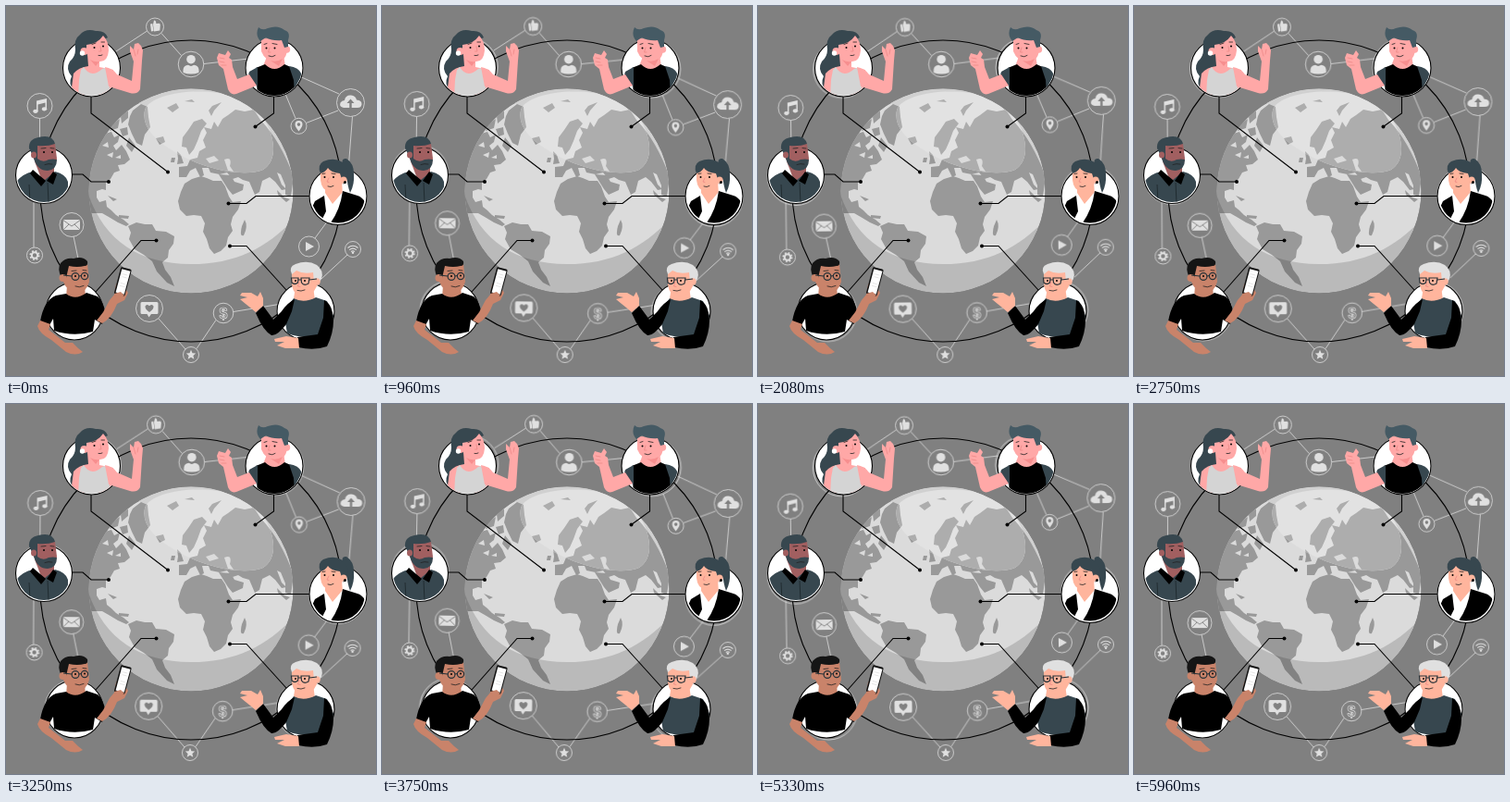
Write an HTML page that moves like this. It is 400 px wide and 400 px high and loops after 6000 ms.

```html
<!DOCTYPE html>
<html lang="en">
<head>
<meta charset="utf-8">
<title>Connected people</title>
<style>
html, body { margin: 0; width: 100%; height: 100%; overflow: hidden; background: #808080; }
svg { display: block; width: 100vw; height: 100vh; }
.wire { fill: none; stroke: #000; stroke-width: 1.1; }
.net { fill: none; stroke: #dadada; stroke-width: .85; }
.glyph { fill: #e0e0e0; }
.disc { fill: #fff; stroke: #000; stroke-width: 1.1; }
.slate { fill: #37474f; }
.steel { fill: #455a64; }
.pink { fill: #ffa8a7; }
.rose { fill: #f78f8f; }
.peach { fill: #ffb59d; }
.brown { fill: #c9836a; }
.dark { fill: #a15f60; }
.ink { fill: none; stroke: #222; stroke-width: .8; stroke-linecap: round; }
.crease { fill: none; stroke: #e98583; stroke-width: .7; stroke-linecap: round; }
.sway { transform-origin: 200px 200px; animation: sway 3s infinite; }
@keyframes sway {
  0% { transform: rotate(0deg); animation-timing-function: steps(18); }
  25% { transform: rotate(1deg); animation-timing-function: steps(36); }
  75% { transform: rotate(-1deg); animation-timing-function: steps(18); }
  100% { transform: rotate(0deg); }
}
</style>
</head>
<body>
<svg viewBox="0 0 400 400">
<defs>
  <clipPath id="globe"><circle cx="200" cy="200" r="110.5"/></clipPath>
  <path id="cap" d="M150 113C156 90 238 83 270 110C291 133 296 166 278 177C255 186 208 175 178 155C157 142 147 128 150 113Z"/>
  <clipPath id="glow"><use href="#cap"/></clipPath>
  <clipPath id="c1"><circle cx="92.500" cy="67" r="30"/></clipPath>
  <clipPath id="c2"><circle cx="290" cy="67" r="30"/></clipPath>
  <clipPath id="c3"><circle cx="41" cy="183" r="29"/></clipPath>
  <clipPath id="c4"><circle cx="359" cy="205.500" r="29"/></clipPath>
  <g id="land">
    <path d="M137 113L146 106L153 109L154 120L156 131L150 139L147 151L141 148L136 138L132 128L134 119Z"/>
    <path d="M124 119L132 113L132 121L125 127ZM115 128L123 122L121 132L112 135ZM123 133L131 131L132 139L126 141ZM133 142L140 151L136 158L130 151Z"/>
    <path d="M104 139L114 136L117 142L123 139L121 147L116 151L119 156L125 150L130 157L134 166L128 171L121 172L123 178L117 180L113 187L108 191L108 199L104 198L98 200L98 207L101 212L108 210L109 217L114 221L119 226L127 231L133 236L130 238L121 234L111 228L104 224L88 224V165Z"/>
    <path d="M110 205L120 209L116 211ZM122 226L133 227L132 230L122 229Z"/>
    <path d="M132 238L141 234L150 236L158 236L162 243L173 244L182 249L181 257L176 264L175 272L169 277L172 285L178 293L182 303L174 299L163 287L158 276L149 269L139 263L133 252L135 245Z"/>
    <path d="M193 192L201 187L211 184L217 186L224 189L233 189L237 195L241 206L245 212L254 211L251 220L245 228L243 236L245 243L240 250L238 259L232 265L225 268L220 262L217 252L213 244L215 235L211 227L203 226L195 227L188 220L186 211L189 201Z"/>
    <path d="M258 231Q262 238 257 248Q252 250 255 238Z"/>
    <path d="M230 182L243 183L247 190L257 193L256 199L245 204L240 198L235 190Z"/>
    <path d="M187 174L196 173L199 166L207 164L209 157L216 153L213 145L217 137L214 131L222 133L225 125L229 131L234 122L240 118L248 112L258 114L268 112L275 123Q297 146 311 185L308 206L302 204L302 194L297 182L293 180L298 193L303 198L298 199L291 190L285 185L277 189L274 201L269 204L263 190L256 188L251 185L245 187L239 180L231 182L221 180L219 175L212 175L214 183L210 185L205 175L199 178L195 185L187 185Z"/>
    <path d="M190 152L191 142L197 134L203 125L212 122L217 127L211 135L207 146L203 155L198 161L195 153ZM185 157L189 161L192 170L185 171L186 165ZM179 164L183 164L182 169L178 169Z"/>
    <path d="M174 110L184 105L187 110L180 115ZM162 143L170 141L172 147L166 150ZM219 113L223 108L233 104L225 113L222 119ZM193 103L201 101L204 104Z"/>
    <path d="M293 199L301 207L307 209L303 212L294 204Z"/>
  </g>
</defs>
<rect width="400" height="400" fill="#808080"/>

<!-- globe -->
<g clip-path="url(#globe)">
  <circle cx="200" cy="200" r="110.5" fill="#dbdbdb"/>
  <path d="M140 103L200 85L270 100L315 180L278 177Z" fill="#d0d0d0"/>
  <use href="#land" fill="#999"/>
  <use href="#cap" fill="#e2e2e2"/>
  <use href="#land" fill="#adadad" clip-path="url(#glow)"/>
  <g fill="#dbdbdb">
    <path d="M216 165L225 162L230 167L220 170ZM236 166Q245 162 242 173L246 179L240 178Z"/>
    <path d="M104 151L110 147L111 153ZM109 161L116 158L115 164ZM118 164L124 161L124 165Z"/>
  </g>
  <path d="M85 190C100 250 140 279 200 279C250 279 285 260 315 226V320H85Z" opacity=".15"/>
</g>

<!-- swaying network -->
<g class="sway">
  <g class="net">
    <path d="M119 49L152.500 27M168 29.500L189.500 53.500M214 62.500L262 57M315 75L360 95M302 95L313 121.500M324.500 126.500L359 113M374.500 119.500L370 178M348 232L334 251M369 269L341 295M298 322L246 330.500M227 339.500L206 370.500M165 338L194 371M73 249L79 278M30 261V202M36.500 121.500V152"/>
    <circle cx="92.500" cy="67" r="31"/><circle cx="290" cy="67" r="31"/>
    <circle cx="41" cy="183" r="30.500"/><circle cx="359" cy="205.500" r="31"/>
    <circle cx="74" cy="330" r="31"/><circle cx="324" cy="330" r="31"/>
    <circle cx="161" cy="22.500" r="9.500"/><circle cx="200" cy="63" r="13.800"/>
    <circle cx="36.500" cy="108" r="13.500"/><circle cx="372.500" cy="104.500" r="15"/>
    <circle cx="316.500" cy="129.800" r="8.500"/><circle cx="71" cy="236.500" r="13"/>
    <circle cx="31" cy="269.500" r="8.500"/><circle cx="327.500" cy="260" r="11"/>
    <circle cx="375" cy="263" r="8.500"/><circle cx="155" cy="327" r="14.500"/>
    <circle cx="235" cy="332" r="10.800"/><circle cx="200" cy="377" r="8.500"/>
  </g>
  <g class="glyph">
    <path d="M156 19.500L158.300 19L159.500 27L157 27.500ZM159 20L160 15.500Q162.500 15.500 162.300 19L166 18.700Q167.300 20 166.700 22L166.300 26.500L160 27.500Z"/>
    <circle cx="200" cy="57.700" r="4.800"/>
    <path d="M191.500 72V69Q192 64 197 63.800Q200 66 203 63.800Q208 64 208.500 69V72Q200 75 191.500 72Z"/>
    <path d="M33 102.500L44 100V111H42.500V104.500L34.500 106.500V114H33Z"/>
    <ellipse cx="32" cy="113.800" rx="2.700" ry="2.100"/><ellipse cx="41.500" cy="111.300" rx="2.700" ry="2.100"/>
    <path d="M365 110Q360 109 361.500 104.500Q363 102 366 102Q367 96 373 96.500Q378 97 379 101.500Q385 102 384.500 106.500Q384 110 380 110Z"/>
    <path d="M372.500 100.500L376.500 105H373.700V110H371.300V105H368.500Z" fill="#808080"/>
    <path d="M316.500 135.500Q312.300 130 312.500 128A4 4 0 0 1 320.500 128Q320.700 130 316.500 135.500ZM316.500 126.300A1.800 1.800 0 1 0 316.500 129.900A1.800 1.800 0 1 0 316.500 126.300Z" fill-rule="evenodd"/>
    <rect x="62" y="231" width="18" height="11" rx="1"/>
    <path d="M62 231.700L71 238L80 231.700M62 241.800L68 236M80 241.800L74 236" fill="none" stroke="#808080" stroke-width=".9"/>
    <path d="M324 255L333 260L324 265Z"/>
    <circle cx="375" cy="266.800" r="1.200"/>
    <path d="M147 320H163Q164.500 320 164.500 321.500V331.500Q164.500 333 163 333H157L154.500 336.500L152.500 333H147Q145.500 333 145.500 331.500V321.500Q145.500 320 147 320Z"/>
    <path d="M155 331Q150 327.500 150.500 324.500Q152 321.500 155 324.200Q158 321.500 159.500 324.500Q160 327.500 155 331Z" fill="#808080"/>
    <path d="M200 371.700L201.500 375.200L205.200 375.500L202.400 378L203.300 381.700L200 379.700L196.700 381.700L197.600 378L194.800 375.500L198.500 375.200Z"/>
    <text x="235" y="337.500" fill="none" stroke="#e0e0e0" stroke-width=".7" font-family="Liberation Sans, Arial, sans-serif" font-size="16" font-weight="bold" text-anchor="middle">$</text>
  </g>
  <g fill="none" stroke="#e0e0e0">
    <circle cx="31" cy="269.500" r="3.200" stroke-width="2"/>
    <circle cx="31" cy="269.500" r="4.700" stroke-width="1.800" stroke-dasharray="1.850"/>
    <path d="M369.500 261.500Q375 257 380.500 261.500M371.200 263.700Q375 260.500 378.800 263.700M373 265.500Q375 264 377 265.500" stroke-width="1.100"/>
  </g>
</g>

<!-- fixed wiring -->
<g class="wire">
  <circle cx="200" cy="200" r="163"/>
  <path d="M92 97V116L175 179.500M289.500 97V116L269.500 130.500M71 182H83L92 190H111M329 205.500H270L260 213.500H240.500M97 309L146 253.500H162.500M242 259.500H260L303 307"/>
</g>
<g>
  <circle cx="175" cy="179.500" r="2"/><circle cx="269.500" cy="130.500" r="2"/><circle cx="111" cy="190" r="2"/>
  <circle cx="240.500" cy="213.500" r="2"/><circle cx="162.500" cy="253.500" r="2"/><circle cx="242" cy="259.500" r="2"/>
</g>
<g class="disc">
  <circle cx="92.500" cy="67" r="31"/><circle cx="290" cy="67" r="31"/><circle cx="41" cy="183" r="30.500"/>
  <circle cx="359" cy="205.500" r="31"/><circle cx="74" cy="330" r="31"/><circle cx="324" cy="330" r="31"/>
</g>

<!-- woman, top left -->
<g>
  <path class="slate" d="M110 34Q107 26 97 27Q86 24 80 31Q73 36 75 47Q75 55 69 60Q64 68 71 76Q67 84 73 90Q80 92 84 84L91 66L90 46Z"/>
  <g clip-path="url(#c1)">
    <path class="pink" d="M88 52L101 57L101 66L116 69L122 96H70L73 73Q79 66 89 65Z"/>
    <path d="M81 69L84 66Q92 79 104 68L107 67L113 79L111 99H78L79 80Z" fill="#d4d4d4"/>
  </g>
  <path class="pink" d="M107 66Q115 67 120 74L136 81L138 60L134 49L134 43L138 47L139 41L143 40L146 43L148 48L147 59L145 90Q142 96 134 94L111 87Z"/>
  <path class="pink" d="M87 42Q99 41 105 32Q111 38 111 48Q110 60 102 60Q91 60 87 51Z"/>
  <circle class="pink" cx="84.500" cy="49" r="4"/><circle cx="82.500" cy="51" r="2.700" fill="#fff"/>
  <path class="rose" d="M91 58Q96 61 101 60L97 65Z"/>
  <circle cx="95.500" cy="45" r="1"/><circle cx="105" cy="43.500" r="1"/>
  <path class="ink" d="M93 41.500L97 40M103 39L106.500 39M100 53.500Q102 54 104 53"/>
  <path class="crease" d="M102 44L103 49L100.500 49M138 47L140 54M143 47L142 52"/>
</g>

<!-- man, top right -->
<g>
  <g clip-path="url(#c2)">
    <path class="pink" d="M283 52H300L302 66L291 73L278 65Z"/>
    <path d="M270 67L280 63Q290 73 301 63L310 67L315 78L313 99H272Z"/>
    <path class="slate" d="M306 65Q318 66 321 77V97H312L311 80ZM272 66L263 71L260 82L272 87Z"/>
  </g>
  <path class="pink" d="M263 74L250 79L245 66L244 58L241 56L243 52L240 48L237 53L230 51L228 56L230 64L235 68L240 90Q243 97 249 95L271 86Z"/>
  <path class="crease" d="M231 56L236 57M231 60L236 61M233 64L238 64"/>
  <path class="pink" d="M276 35L302 36L304 47Q303 60 292 60Q280 60 276 49Z"/>
  <circle class="pink" cx="303.500" cy="47" r="3.700"/>
  <path class="steel" d="M275 38Q269 31 273 23Q277 27 283 24Q294 20 301 26Q308 28 305 37L305 44L301 45L298 37Q288 38 281 34Z"/>
  <circle cx="281.500" cy="45.500" r="1"/><circle cx="290.500" cy="45.500" r="1"/>
  <path class="ink" d="M279 41.500L282 40.500M288 40.500L293 41.500M284 54Q288 56 291 53.500"/>
  <path class="crease" d="M285 45L283.500 50L286 50"/>
  <path class="rose" d="M286 59Q293 61 299 57L295 65Z"/>
</g>

<!-- bearded man, left -->
<g>
  <g clip-path="url(#c3)">
    <path class="dark" d="M31 168L52 172L52 190L39 189Z"/>
    <path class="slate" d="M10 192Q16 182 29 179L42 188L53 179Q65 182 67 190V216H10Z"/>
    <path d="M29 177L43 189L38 195L26 181ZM51 179L55 182L51 193L44 189Z"/>
    <path d="M45 191L46 213M25 193L26 213" stroke="#1b2529" stroke-width=".8"/>
  </g>
  <path class="dark" d="M30 150L53 149L55 165Q54 176 44 177Q34 177 30 164Z"/>
  <path class="slate" d="M29 162L25 154Q24 144 35 142Q50 138 53 149Q45 152 34 151L34 165Q40 170 46 166Q51 165 55 166Q55 177 45 178Q34 178 30 165Z"/>
  <ellipse class="dark" cx="30" cy="161" rx="3" ry="3.500"/>
  <path class="ink" d="M42 171.500Q46 170 50 171" stroke="#6b3c3e"/>
  <circle cx="41" cy="158" r="1"/><circle cx="50" cy="158" r="1"/>
  <path class="ink" d="M38 154L43 153.500M48 153.500L52 154"/>
</g>

<!-- woman, right -->
<g>
  <path class="slate" d="M364 172Q362 164 368 165Q376 170 376 181Q377 193 372 202Q369 194 368 182Z"/>
  <g clip-path="url(#c4)">
    <path class="peach" d="M345 190L363 190L364 204L354 222L345 206Z"/>
    <path d="M345 202L353 214L364 201L366 220L355 238H336Z" fill="#fff"/>
    <path d="M344 205L334 211L328 224L337 234L340 234L346 222ZM364 200L380 205Q389 208 390 220L379 237H349Q361 222 364 200Z"/>
  </g>
  <path class="peach" d="M340 176L362 173L365 189Q361 201 351 201Q341 200 340 188Z"/>
  <path class="slate" d="M340 181Q336 172 343 168Q355 163 364 169Q372 176 369 187L365 193L361 181Q351 180 348 175Q345 180 340 181Z"/>
  <circle class="peach" cx="365" cy="188" r="3.500"/><circle cx="366.500" cy="190.500" r="1.500"/>
  <circle cx="344.500" cy="185" r="1"/><circle cx="354" cy="185" r="1"/>
  <path class="ink" d="M342 181.500L345 181M352 181L356 181.500M348 195Q351 196.500 354 194.500"/>
  <path class="crease" d="M349 186L347 190L349 190.500"/>
</g>

<!-- man with phone, bottom left -->
<g>
  <path class="brown" d="M66 302L85 301L86 316L76 322L65 315Z"/>
  <path d="M65 311Q75 319 87 310L99 314Q106 320 107 331L104 344L96 339L94 352Q73 358 52 351L51 338L47 345L37 341Q41 318 54 313Z"/>
  <path class="brown" d="M37 340L34 346Q36 354 49 361L65 374Q75 379 83 374L78 370L72 364L64 364L46 350L48 344Z"/>
  <path class="brown" d="M104 343L98 340L105 331L112 318L117 312L119 301L123 296L132 310L128 318L120 322Q114 338 104 343Z"/>
  <path class="brown" d="M62 281L88 279L90 298Q87 310 77 310Q66 309 62 298Z"/>
  <path d="M60 294Q55 284 59 278Q64 272 73 273Q83 270 88 276Q89 281 85 281Q77 283 68 281L65 294Z" fill="#151515"/>
  <circle class="brown" cx="61.500" cy="294" r="4"/>
  <path class="ink" d="M75 303Q79 305 84 302.500"/>
  <circle cx="75" cy="292" r="1"/><circle cx="85" cy="291.500" r="1"/>
  <g fill="none" stroke="#263238" stroke-width="1.200">
    <circle cx="75" cy="292.500" r="3.900"/><circle cx="85" cy="292" r="3.600"/>
    <path d="M62 291L71 292M79 292L81.500 291.500"/>
  </g>
  <path class="ink" d="M71 286.500L76 286M83 285.500L87 286"/>
  <g transform="translate(126.300 298) rotate(15)">
    <rect x="-6" y="-15" width="12" height="30" rx="1.800" fill="#111"/>
    <rect x="-4.500" y="-13" width="9.500" height="26" fill="#fff"/>
    <path d="M-2 -8H3M-2 -5H3M-2 2H3M-2 5H3" stroke="#ddd" stroke-width=".7"/>
  </g>
  <path class="brown" d="M117 311L124 309L128 313L120 317Z"/>
</g>

<!-- man with glasses, bottom right -->
<g>
  <path class="peach" d="M313 304L332 303L334 318L322 324L311 316Z"/>
  <path class="slate" d="M311 316Q322 322 335 315L347 319L354 335L350 354Q327 362 304 354L300 330Z"/>
  <path d="M312 317Q304 321 298 330L289 339L278 324L270 332Q278 351 287 356Q293 357 303 344L309 330ZM344 318Q353 322 354 340Q354 354 347 368Q333 373 316 369L315 358L337 355L343 337Z"/>
  <path class="peach" d="M270 331L278 324L278 316L275 309L272 314L265 310L255 310L253 313L261 315L253 317L259 322L264 326Z"/>
  <path class="peach" d="M316 359L303 357L290 360L291 363L301 363L293 367L302 370L317 370Z"/>
  <path class="peach" d="M309 286L335 285L336 303Q331 314 321 314Q310 313 309 300Z"/>
  <path d="M309 290Q305 282 313 279Q326 274 336 280Q344 286 341 295L337 302L333 298L332 288Q321 290 314 286Z" fill="#e0e0e0"/>
  <circle class="peach" cx="336" cy="298" r="3.700"/>
  <circle cx="313" cy="297" r="1"/><circle cx="323" cy="297" r="1"/>
  <g fill="none" stroke="#263238" stroke-width="1.200">
    <path d="M308.500 294H316L315.500 299Q312 302 309 299ZM319 294H328L327 300Q322 303 319.500 299ZM316 296H319M328 296L336 295"/>
  </g>
  <path class="crease" d="M317 298L315.500 303L318 303.500"/>
  <path class="ink" d="M315 307.500Q319 309 323 307"/>
</g>
</svg>
</body>
</html>
```
